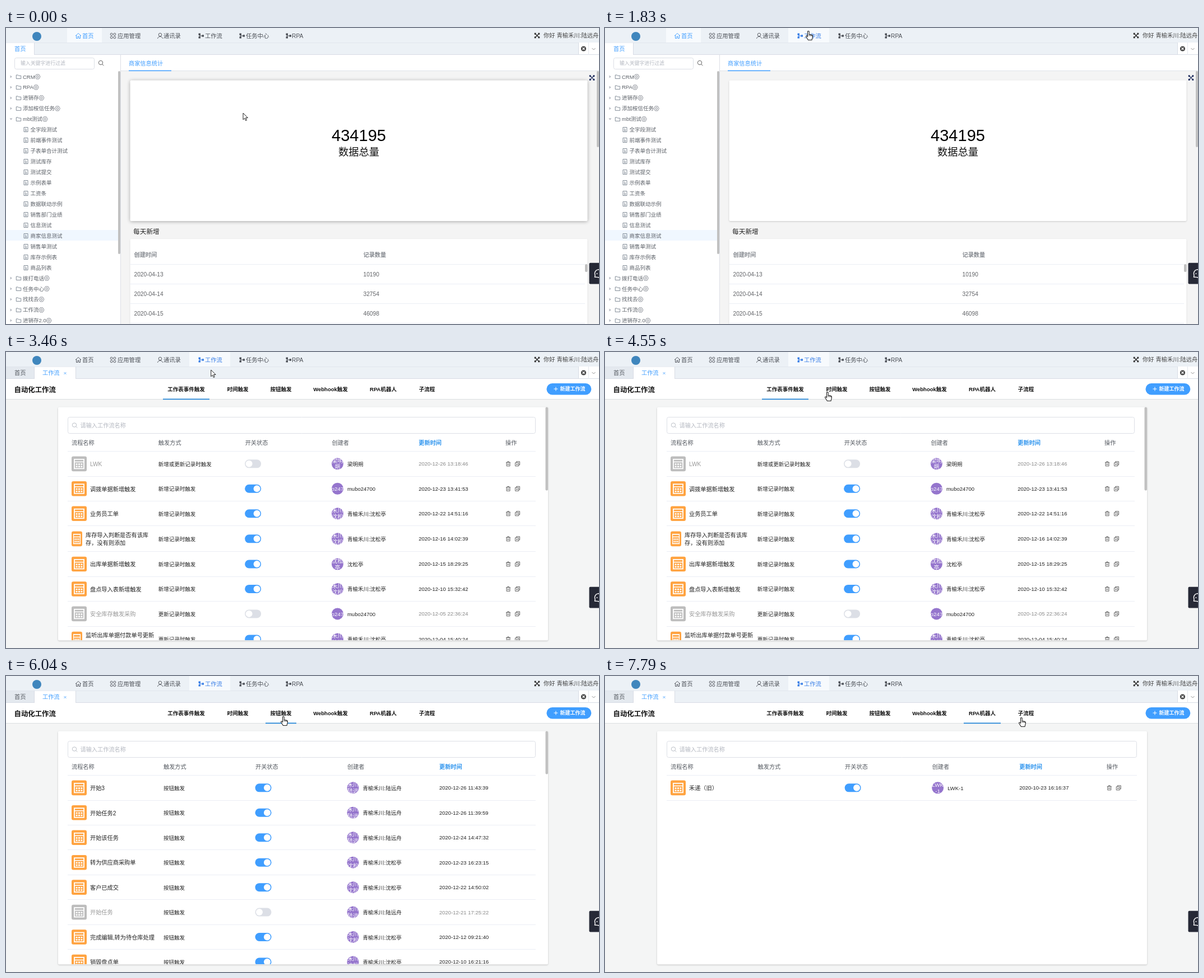
Animation of 1058x529 px, one loop 8 s. Source, as an HTML page with a canvas:

```html
<!DOCTYPE html>
<html lang="zh-CN">
<head>
<meta charset="utf-8">
<title>自动化工作流</title>
<style>
html, body { margin: 0; width: 100%; height: 100%; overflow: hidden; background: #f4f5f5; }
canvas { display: block; }
</style>
</head>
<body>
<canvas id="stage" width="1058" height="529"></canvas>
<script>
const ctx = document.getElementById('stage').getContext('2d');
const LOOP = 8000, BLUE = '#409eff', NAV_BLUE = '#3a7fe6', INK = '#222', BAR = '#ecf1f6';
const FONT = '"Liberation Sans", "Noto Sans CJK SC", "Noto Sans CJK JP", sans-serif';

// ---------- drawing helpers ----------
function rect(x, y, w, h, color) {
  ctx.fillStyle = color;
  ctx.fillRect(x, y, w, h);
}

function box(x, y, w, h, r, fill, stroke) {
  ctx.beginPath();
  ctx.roundRect(x, y, w, h, r);
  if (fill) { ctx.fillStyle = fill; ctx.fill(); }
  if (stroke) { ctx.strokeStyle = stroke; ctx.lineWidth = 1; ctx.stroke(); }
}

function disc(x, y, r, fill) {
  ctx.beginPath();
  ctx.arc(x, y, r, 0, 7);
  ctx.fillStyle = fill;
  ctx.fill();
}

function text(str, x, y, size, color = INK, opt = {}) {
  ctx.font = `${opt.bold ? 'bold ' : ''}${size}px ${FONT}`;
  ctx.textAlign = opt.align || 'left';
  ctx.fillStyle = color;
  ctx.fillText(str, x, y + size * 0.37);
  return ctx.measureText(str).width;
}

function icon(d, x, y, color, width = 1, fill) {
  const path = new Path2D(d);
  ctx.save();
  ctx.translate(x, y);
  if (fill) { ctx.fillStyle = fill; ctx.fill(path); }
  if (width) { ctx.strokeStyle = color; ctx.lineWidth = width; ctx.stroke(path); }
  ctx.restore();
}

function card(x, y, w, h, blur, alpha) {
  ctx.save();
  ctx.shadowColor = `rgba(0,0,0,${alpha})`;
  ctx.shadowBlur = blur;
  ctx.shadowOffsetY = 1;
  box(x, y, w, h, 2, '#fff');
  ctx.restore();
}

const ICON = {
  home: 'M-5 0L0-4.5L5 0M-3.5-1V4.5H-1V1H1V4.5H3.5V-1',
  apps: 'M-.8-2.8a2 2 0 1 1-4 0a2 2 0 1 1 4 0M4.8-2.8a2 2 0 1 1-4 0a2 2 0 1 1 4 0M-.8 2.8a2 2 0 1 1-4 0a2 2 0 1 1 4 0M4.8 2.8a2 2 0 1 1-4 0a2 2 0 1 1 4 0',
  person: 'M2.8-2a2.8 2.8 0 1 1-5.6 0a2.8 2.8 0 1 1 5.6 0M-4.5 5C-4 .2 4 .2 4.5 5',
  flow: 'M-4.5-4.5h3.5v3.4h-3.5zM-4.5 1.2h3.5v3.4h-3.5zM1.6-1.8h3.4v3.5h-3.4zM-3.2-2h1v4h-1zM-2-.5h4v1h-4z',
  expand: 'M-4-4L4 4M4-4L-4 4M-4-1.8V-4H-1.8M1.8-4H4V-1.8M4 1.8V4H1.8M-1.8 4H-4V1.8',
  search: 'M3.2-.5a3.7 3.7 0 1 1-7.4 0a3.7 3.7 0 1 1 7.4 0M2.2 2.2L4.8 4.8',
  folder: 'M-4.2-3H-1L0-1.8H4.2V3.5H-4.2Z',
  doc: 'M-3.5-4H3.5V4H-3.5ZM-1.7-1.5H0M-1.7.4H1.7M-1.7 2.2H1.7',
  gear: 'M-4.6 0L-2.3-4H2.3L4.6 0L2.3 4H-2.3ZM1.8 0a1.8 1.8 0 1 1-3.6 0a1.8 1.8 0 1 1 3.6 0',
  right: 'M-1.5-2.5L2 0L-1.5 2.5Z',
  down: 'M-2.5-1.5L0 2L2.5-1.5Z',
  chevron: 'M-3-1.5L0 1.5L3-1.5',
  cross: 'M-2-2L2 2M2-2L-2 2',
  plus: 'M-3.5 0H3.5M0-3.5V3.5',
  trash: 'M-4-2.5H4M-1.3-2.5V-4H1.3V-2.5M-3-2.5V4H3V-2.5M-1-.5V2.2M1-.5V2.2',
  copy: 'M-4-2H2V4H-4ZM-2-2V-4H4V2H2M-2.3 1H.4M-1 0V2.4',
  bubble: 'M-5.5 6L-5 2.5A6.5 7 0 1 1-1 6.4Z',
  arrow: 'M0 0V11.8L2.8 9.2L4.6 13.5L6.5 12.7L4.7 8.5H8.4Z',
  hand: 'M-1.5 1.2C-1.5-.4 1.2-.4 1.2 1.2V6L4 6.4L6.3 7.1C7.8 7.5 7.6 9 7.3 11L6 16H-.5L-4.2 10.2C-5 8.3-3.2 7.8-1.5 9.8Z'
};

// ---------- timing ----------
const clamp = v => Math.max(0, Math.min(1, v));
const mix = (a, b, p) => a + (b - a) * p;
const mixColor = (a, b, p) => `rgb(${a.map((v, i) => Math.round(mix(v, b[i], p)))})`;

// Progress in n discrete jumps, the first at t0 and the last at t1.
function steps(t, t0, t1, n) {
  if (t < t0) return 0;
  return clamp((Math.floor((t - t0) / (t1 - t0) * (n - 1) + 1e-6) + 1) / n);
}

const PAGE_AT = 2690, PAGE_DONE = 3150;
const moves = [
  [670, 1210, 8, 297, 115], [1360, 1830, 7, 363, 5],
  [3460, 3700, 4, 374, 113], [3770, 3930, 3, 330, 71],
  [4380, 4550, 3, 397, 71], [5350, 5650, 5, 488, 77],
  [5800, 5960, 2, 495, 72], [6130, 6460, 5, 580, 71],
  [6850, 7020, 3, 676, 72], [7630, 7790, 3, 743, 74]
];
const tabs = [
  ['工作表事件触发', 280, 363], ['时间触发', 385, 442], ['按钮触发', 463, 518],
  ['Webhook触发', 540, 618], ['RPA机器人', 640, 706], ['子流程', 728, 774]
];
const clicks = [[4950, 5130, 3], [5800, 5960, 3], [6690, 6850, 3], [7330, 7410, 2]];

// ---------- content ----------
const ORG = '青榆禾川:';
const people = {
  lu: [ORG + '陆远舟', '禾川', '陆远'],
  shen: [ORG + '沈松亭', '禾川', '沈松'],
  solo: ['沈松亭', '沈松', '亭'],
  liang: ['梁明朔', '梁明', '朔'],
  mubo: ['mubo24700', 'o247'],
  bot: ['LWK-1', 'LWK', '-1']
};
const ADD = '新增记录时触发', PRESS = '按钮触发';
const row = (name, trigger, who, date, off = false) => ({ name: name.split('/'), trigger, who, date, off });

const lists = [
  {
    width: 835, scroll: 149, actions: true, rows: [
      row('LWK', '新增或更新记录时触发', 'liang', '2020-12-26 13:18:46', true),
      row('调拨单据新增触发', ADD, 'mubo', '2020-12-23 13:41:53'),
      row('业务员工单', ADD, 'shen', '2020-12-22 14:51:16'),
      row('库存导入判断是否有该库/存，没有则添加', ADD, 'shen', '2020-12-16 14:02:39'),
      row('出库单据新增触发', ADD, 'solo', '2020-12-15 18:29:25'),
      row('盘点导入表新增触发', ADD, 'shen', '2020-12-10 15:32:42'),
      row('安全库存触发采购', '更新记录时触发', 'mubo', '2020-12-05 22:36:24', true),
      row('监听出库单据付款单号更新/触发', '更新记录时触发', 'shen', '2020-12-04 15:40:24')
    ]
  },
  { width: 839, actions: true, rows: [row('开始任务', '时间触发', 'lu', '2020-12-21 17:25:22')] },
  {
    width: 835, scroll: 77, rows: [
      row('开始3', PRESS, 'lu', '2020-12-26 11:43:39'),
      row('开始任务2', PRESS, 'lu', '2020-12-26 11:39:59'),
      row('开始该任务', PRESS, 'lu', '2020-12-24 14:47:32'),
      row('转为供应商采购单', PRESS, 'shen', '2020-12-23 16:23:15'),
      row('客户已成交', PRESS, 'shen', '2020-12-22 14:50:02'),
      row('开始任务', PRESS, 'lu', '2020-12-21 17:25:22', true),
      row('完成编辑,转为待仓库处理', PRESS, 'shen', '2020-12-12 09:21:40'),
      row('销毁盘点单', PRESS, 'shen', '2020-12-10 16:21:16')
    ]
  },
  null,
  { width: 839, actions: true, rows: [row('禾递（旧）', '', 'bot', '2020-10-23 16:16:37')] }
];

const folders = ['CRM', 'RPA', '进销存', '添加桉信任务', 'mbt测试'];
const forms = ['全字段测试', '前端事件测试', '子表单合计测试', '测试库存', '测试提交', '示例表单', '工资条',
  '数据联动示例', '销售部门业绩', '信息测试', '商家信息测试', '销售单测试', '库存示例表', '商品列表'];
const moreFolders = ['拨打电话', '任务中心', '找找去', '工作流', '进销存2.0'];
const tree = [...folders, ...forms, ...moreFolders];

const nav = [
  ['首页', 'home', 129, 136], ['应用管理', 'apps', 191, 199], ['通讯录', 'person', 275, 281],
  ['工作流', 'flow', 348, 355], ['任务中心', 'flow', 421, 428], ['RPA', 'flow', 504, 510]
];

// ---------- parts ----------
function drawTopBar(t) {
  const onFlow = t >= PAGE_AT;
  rect(0, 0, 1058, 48, BAR);
  if (!onFlow) rect(109, 0, 62, 26, '#f7fafd');
  if (t >= 1830) rect(327, 0, 73, 26, '#f7fafd');
  disc(55, 15, 8, '#3f86bd');
  nav.forEach(([label, shape, ix, tx], i) => {
    const color = i === 0 && !onFlow ? BLUE : i === 3 && t >= 1830 ? NAV_BLUE : '#4c5057';
    const solid = shape === 'flow';
    icon(ICON[shape], ix, 14, color, solid ? 0 : 0.9, solid && color);
    text(label, tx, 14, 10.3, color);
  });
  icon(ICON.expand, 947.5, 13.5, '#333', 1.5);
  text('你好 ' + people.lu[0], 959, 13.5, 10.3, '#444');
  drawPageTabs(t);
}

function drawPageTabs(t) {
  rect(0, 47, 1058, 1, '#d8dce5');
  const p = steps(t, PAGE_AT + 80, PAGE_DONE, 6), blue = [64, 158, 255], dark = [80, 85, 92];
  if (t < PAGE_AT) {
    rect(0, 26, 50, 22, '#fff');
    rect(50, 26, 1, 22, '#d8dce5');
    text('首页', 15, 37, 10.2, BLUE);
  } else {
    const w = mix(65, 74, p);
    rect(0, 26, 50, 21, '#e4e9ef');
    rect(50, 26, w, 22, '#fff');
    rect(50, 26, 1, 22, '#d8dce5');
    rect(50 + w, 26, 1, 22, '#d8dce5');
    text('首页', 15, 37, 10.2, mixColor(blue, dark, p));
    text('工作流', 65, 37, 10.2, mixColor(dark, blue, p));
    ctx.globalAlpha = p;
    icon(ICON.cross, 105.5, 38, BLUE, 0.8);
    ctx.globalAlpha = 1;
  }
  rect(0, 26, 1021, 0.6, '#dde2e9');
  rect(1021, 26, 37, 21, '#fff');
  rect(1021, 26, 1, 22, '#d8dce5');
  rect(1039, 26, 1, 22, '#e4e7ed');
  disc(1030.5, 37, 4.6, '#444');
  icon(ICON.cross, 1030.5, 37, '#fff', 1.2);
  icon(ICON.chevron, 1048.5, 37.5, '#888', 0.9);
}

function drawSidebar() {
  rect(0, 48, 204, 481, '#fff');
  rect(204, 48, 1, 481, '#dcdfe6');
  box(15.5, 53.5, 142, 20, 3, '#fff', '#dcdfe6');
  text('输入关键字进行过滤', 26, 63, 8.9, '#b4b8c0');
  icon(ICON.search, 169.5, 62.5, '#555', 0.9);
  rect(0, 361, 200, 19, '#f0f7ff');
  tree.forEach((label, i) => {
    const y = 87 + i * 18.95, isForm = i >= 5 && i < 19;
    if (isForm) {
      icon(ICON.doc, 35.5, Math.floor(y) + 0.5, '#75808d', 0.9);
      text(label, 43.5, y, 9.5, '#5c6168');
      return;
    }
    icon(i === 4 ? ICON.down : ICON.right, 9, y, '', 0, '#b9bdc5');
    icon(ICON.folder, 22.5, y, '#75808d', 0.9);
    const w = text(label, 30, y, 9.5, '#5c6168');
    icon(ICON.gear, 30 + w + 4.8, y, '#6c727b', 0.8);
  });
  box(200, 77, 4, 327, 2, '#c1c1c1');
}

function drawHome(t) {
  rect(205, 48, 853, 481, '#f4f4f4');
  rect(205, 48, 853, 29, '#fff');
  rect(205, 76, 853, 1, '#e0e3e9');
  text('商家信息统计', 219, 63, 10.2, BLUE);
  rect(219, 75.6, 76, 1.5, BLUE);
  const leave = clamp((t - 1440) / 300);
  card(221.5, 93.5, 816, 251.5, mix(6, 3, leave), mix(0.32, 0.18, leave));
  text('434195', 629.5, 191, 29, '#000', { align: 'center' });
  text('数据总量', 629.5, 221, 18.3, '#111', { align: 'center' });
  text('每天新增', 227, 364, 11.7, '#222');
  card(221.5, 377, 816, 170, 3, 0.12);
  text('创建时间', 228.5, 405, 10.2, '#85898f', { bold: true });
  text('记录数量', 637.5, 405, 10.2, '#85898f', { bold: true });
  [['2020-04-13', '10190'], ['2020-04-14', '32754'], ['2020-04-15', '46098']].forEach(([day, count], i) => {
    const y = 440 + i * 35;
    rect(221, y - 18, 812, 1, '#ebeef5');
    text(day, 228.5, y, 10.2, '#606266');
    text(count, 637.5, y, 10.2, '#606266');
  });
  rect(221, 527, 812, 1, '#ebeef5');
  box(1033, 422, 4.5, 14, 2, '#c0c0c0');
  box(1054, 77, 4, 136, 2, '#c1c1c1');
  icon(ICON.expand, 1045.5, 89, '#1d2b5c', 1.5);
  drawSidebar();
}

function drawCalendar(x, y, w, color) {
  box(x, y - 13.3, w, 26.6, 3, color);
  ctx.save();
  ctx.translate(x + w / 2, y);
  ctx.scale(w / 27, 1);
  ctx.strokeStyle = '#fff';
  ctx.lineWidth = 1.8;
  ctx.strokeRect(-8.5, -8, 17, 16.5);
  rect(-8.5, -4.2, 17, 1.6, '#fff');
  for (let i = 0; i < 6; i++) rect(-5.9 + i % 3 * 4.4, -0.6 + (i > 2) * 4.2, 3, 2.6, '#fff');
  ctx.restore();
}

function drawAvatar(x, y, lines) {
  disc(x, y, 10.5, '#9575cd');
  ctx.save();
  ctx.clip();
  const top = lines.length > 1 ? y - 5.5 : y;
  lines.forEach((line, i) => text(line, x, top + i * 11.5, 9.8, '#fff', { align: 'center' }));
  ctx.restore();
}

function drawRow(r, y, cols) {
  const two = r.name.length > 1, ink = r.off ? '#999' : INK;
  drawCalendar(117, y, two ? 19 : 27, r.off ? '#bdbdbd' : '#ffa340');
  r.name.forEach((line, i) => text(line, two ? 142 : 150, y + (two ? i * 14 - 7 : 0.5), 10.2, ink));
  text(r.trigger, cols[1], y + 0.5, 9.5);
  const sx = cols[2] - 0.5;
  box(sx, y - 7.5, 29, 15, 7.5, r.off ? '#dcdfe6' : BLUE);
  disc(sx + (r.off ? 7.5 : 21.5), y, 6, '#fff');
  const [name, ...initials] = people[r.who];
  drawAvatar(cols[3] + 10, y, initials);
  text(name, cols[3] + 27.5, y + 0.5, 9.5);
  text(r.date, cols[4], y, 9.5, r.off ? '#888' : INK);
  if (cols[5]) {
    icon(ICON.trash, cols[5] + 5, y, '#555', 0.9);
    icon(ICON.copy, cols[5] + 21.5, y, '#555', 0.9);
  }
}

function drawList({ width, scroll, actions, rows }) {
  box(110.5, 116.5, width - 1, 29, 3, '#fff', '#dcdfe6');
  icon(ICON.search, 122.5, 131, '#b4b8c0', 0.9);
  text('请输入工作流名称', 132.5, 131, 10.2, '#b4b8c0');
  const gap = actions ? (width + 1) / 5.4 : 164;
  const heads = ['流程名称', '触发方式', '开关状态', '创建者', '更新时间', '操作'].slice(0, actions ? 6 : 5);
  const cols = heads.map((_, i) => 117 + i * gap);
  heads.forEach((h, i) => text(h, cols[i], 162, 10.2, i === 4 ? '#2b93ee' : '#555a61', { bold: i === 4 }));
  rect(110, 177, width, 1, '#ebeef5');
  ctx.save();
  ctx.beginPath();
  ctx.rect(93, 98, 874, 417);
  ctx.clip();
  let top = 177.6;
  for (const r of rows) {
    const h = r.name.length > 1 ? 45.8 : 44.45;
    drawRow(r, top + h / 2, cols);
    top += h;
    rect(110, Math.floor(top), width, 1, '#ebeef5');
  }
  ctx.restore();
  if (scroll) box(962.5, 98.5, 4.5, scroll, 2, '#c1c1c1');
}

function drawWorkflow(t) {
  rect(0, 48, 1058, 481, '#f4f5f5');
  rect(0, 48, 1058, 37, '#fff');
  rect(0, 84, 1058, 1, '#dcdee1');
  text('自动化工作流', 14.5, 67.5, 12.4, '#111', { bold: true });
  tabs.forEach(([label, a, b]) => text(label, (a + b) / 2, 66, 9.5, '#111', { bold: true, align: 'center' }));
  let [, left, right] = tabs[0], page = 0;
  clicks.forEach(([t0, t1, n], i) => {
    const p = steps(t, t0, t1, n);
    left = mix(left, tabs[i + 1][1], p);
    right = mix(right, tabs[i + 1][2], p);
    if (p) page = i + 1;
  });
  rect(left, 83.5, right - left, 1.7, '#1f83d6');
  box(964.5, 56, 79.8, 20.5, 10.2, BLUE);
  icon(ICON.plus, 981, 66, '#fff', 1);
  text('新建工作流', 988.5, 66, 9, '#fff', { bold: true });
  card(93, 98.5, 874, 417, 3, 0.2);
  if (lists[page]) {
    drawList(lists[page]);
  } else {
    disc(530, 247, 44, '#f4f4f4');
    disc(530, 247, 30, '#0d9dff');
    text('webhook触发器触发时运行流程', 529.5, 309, 10.2, INK, { align: 'center' });
  }
}

function drawLoading(t) {
  if (t >= PAGE_AT && t < PAGE_DONE) {
    ctx.globalAlpha = 1 - steps(t, 2920, PAGE_DONE, 4);
    rect(0, 0, mix(430, 1058, steps(t, 2770, 2850, 2)), 1.6, '#2b9ddf');
    ctx.beginPath();
    ctx.arc(1043, 13, 5.5, t / 64, t / 64 + 1.6);
    ctx.strokeStyle = '#2b9ddf';
    ctx.lineWidth = 1.5;
    ctx.stroke();
    ctx.globalAlpha = 1;
  }
  if (t >= 2360 && t < 2920) {
    box(-2, 515, 353.5, 16, 2, '#dee1e6', '#c3c6ca');
    text('正在等待 8010.liang.51pdzz.com 的响应...', 3, 522.5, 8.9, '#444');
  }
}

function drawChat() {
  box(1040.5, 419.7, 22, 37.8, 2, '#262936');
  icon(ICON.bubble, 1056, 439, '#fff', 1.4);
  disc(1054.5, 439, 1, '#fff');
}

function drawCursor(t) {
  let x = 423, y = 152;
  for (const [t0, t1, n, tx, ty] of moves) {
    const p = steps(t, t0, t1, n);
    x = mix(x, tx, p);
    y = mix(y, ty, p);
  }
  const onTab = y > 55 && y < 85 && tabs.some(([, a, b]) => x >= a && x <= b);
  if (y < 26 || (t >= PAGE_AT && onTab)) {
    icon(ICON.hand, x, y + 0.5, '#222', 1.1, '#fff');
    icon('M1.2 6V9M3.7 6.6V9.2M6 7.2V9.5', x, y + 0.5, '#222', 0.9);
  } else {
    icon(ICON.arrow, x, y, '#222', 1, '#fff');
  }
}

function render(now) {
  const t = now % LOOP;
  if (t < PAGE_AT) drawHome(t); else drawWorkflow(t);
  drawTopBar(t);
  drawChat();
  drawLoading(t);
  drawCursor(t);
}

const start = performance.now();
function tick() {
  render(performance.now() - start);
  requestAnimationFrame(tick);
}
tick();
</script>
</body>
</html>
```
